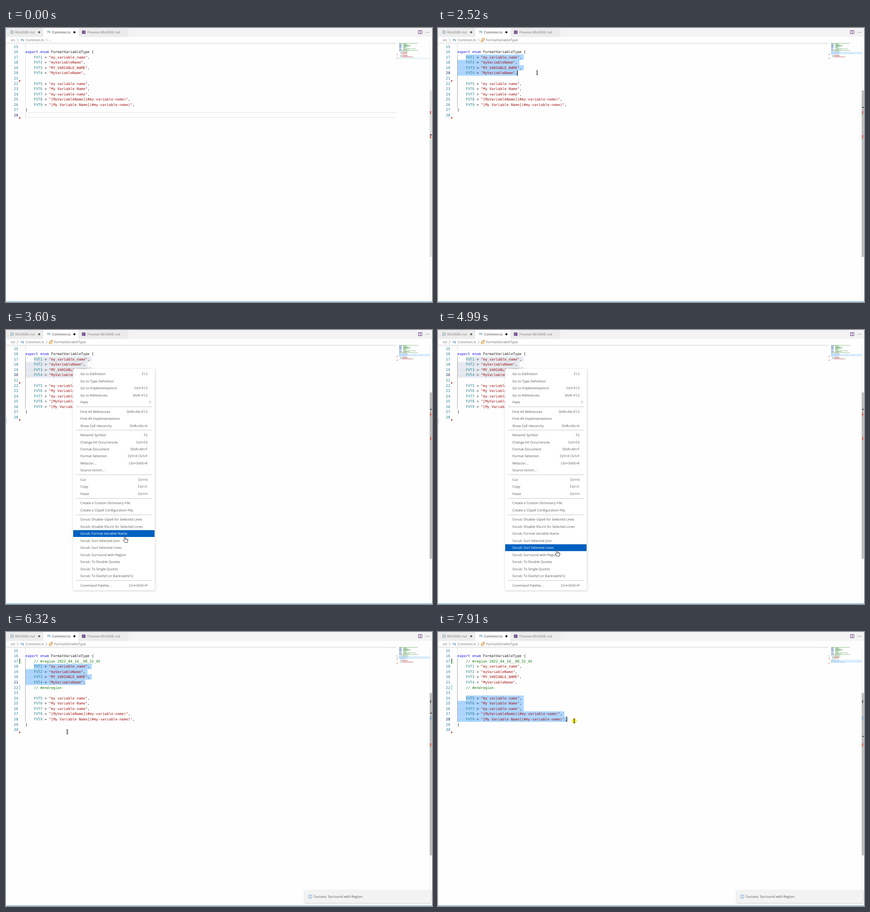
An HTML page with a canvas for the animation above (8 s loop, 932 by 601 pixels).

```html
<!DOCTYPE html>
<html lang="en">
<head>
<meta charset="utf-8">
<title>Surround with Region</title>
<style>
  html, body { margin: 0; height: 100%; overflow: hidden; background: #fff; }
  canvas { display: block; }
</style>
</head>
<body>
<canvas id="stage" width="932" height="601"></canvas>
<script>
const ctx = document.getElementById('stage').getContext('2d');
ctx.textRendering = 'geometricPrecision';

const LOOP = 8000;
const MENU_OPEN = 2860, MENU_CLOSE = 5200, INSERTED = 5270, TOAST = 5480;
const FIRST_LINE = 15, TOP = 35.1, LINE_H = 11.57, CHAR_W = 4.69, CODE_X = 42.2;
const UI = '7.45px "Open Sans", "Noto Sans", sans-serif';
const BOLD = '700 6.4px "Open Sans", "Noto Sans", sans-serif';
const MONO = '7.79px "DejaVu Sans Mono", monospace';
const UI_TEXT = '#585858';

const member = (n, value) => `    FVT${n} = "${value}",`;
const before = [
  '', 'export enum FormatVariableType {',
  member(1, 'my_variable_name'), member(2, 'myVariableName'),
  member(3, 'MY_VARIABLE_NAME'), member(4, 'MyVariableName'), '',
  member(5, 'my variable name'), member(6, 'My Variable Name'),
  member(7, 'my-variable-name'), member(8, '[MyVariableName](#my-variable-name)'),
  member(9, '[My Variable Name](#my-variable-name)'), '}', ''
];
const after = [...before];
after.splice(6, 0, '    // #endregion');
after.splice(2, 0, '    // #region 2022_04_10__08_32_45');

// '-' is a separator; shortcuts follow a bar
const ITEM_H = 15.45;
const menuItems = [];
const separators = [];
let menuY = 96.6;
for (const entry of [
  'Go to Definition|F12', 'Go to Type Definition', 'Go to Implementations|Ctrl+F12',
  'Go to References|Shift+F12', 'Peek', '-',
  'Find All References|Shift+Alt+F12', 'Find All Implementations', 'Show Call Hierarchy|Shift+Alt+H', '-',
  'Rename Symbol|F2', 'Change All Occurrences|Ctrl+F2', 'Format Document|Shift+Alt+F',
  'Format Selection|Ctrl+K Ctrl+F', 'Refactor...|Ctrl+Shift+R', 'Source Action...', '-',
  'Cut|Ctrl+X', 'Copy|Ctrl+C', 'Paste|Ctrl+V', '-',
  'Create a Custom Dictionary File.', 'Create a CSpell Configuration File.', '-',
  'Sorub: Disable cSpell for Selected Lines', 'Sorub: Disable ESLint for Selected Lines',
  'Sorub: Format Variable Name', 'Sorub: Sort Selected Json', 'Sorub: Sort Selected Lines',
  'Sorub: Surround with Region', 'Sorub: To Double Quotes', 'Sorub: To Single Quotes',
  'Sorub: To Slash(/) or Backslash(\\\\)', '-', 'Command Palette...|Ctrl+Shift+P'
]) {
  if (entry === '-') {
    separators.push(Math.round(menuY - 6));
    menuY += 5.1;
  } else {
    const [label, keys = ''] = entry.split('|');
    menuItems.push({ label, keys, y: menuY });
    menuY += ITEM_H;
  }
}

// time, x, y
const mousePath = [
  [210, 520, 590], [540, 343, 275], [800, 343, 275], [1600, 62, 64], [1930, 62, 64],
  [2320, 231, 101], [2450, 231, 101], [2720, 148, 85], [2860, 148, 85], [3140, 155, 106],
  [3530, 260, 453], [3600, 260, 453], [3800, 260, 483], [4990, 260, 483], [5150, 260, 496],
  [5780, 260, 496], [6320, 134, 219], [6580, 75, 143], [6650, 75, 143], [7050, 62, 144],
  [7180, 62, 144], [7910, 298, 195]
];

const clamp = (v, lo, hi) => Math.min(hi, Math.max(lo, v));

function mouseAt(t) {
  const i = mousePath.findIndex(p => p[0] > t);
  if (i <= 0) return mousePath.at(i);
  const [t0, x0, y0] = mousePath[i - 1], [t1, x1, y1] = mousePath[i];
  const u = (t - t0) / (t1 - t0), s = u * u * (3 - 2 * u);
  return [t, x0 + (x1 - x0) * s, y0 + (y1 - y0) * s];
}

const lineTop = n => TOP + (n - FIRST_LINE) * LINE_H;
const colX = c => CODE_X + c * CHAR_W;

function rect(x, y, w, h, color) {
  ctx.fillStyle = color;
  ctx.fillRect(x, y, w, h);
}
function text(s, x, y, color, font = UI, align = 'left') {
  ctx.font = font;
  ctx.textAlign = align;
  ctx.fillStyle = color;
  ctx.fillText(s, x, y);
}
function dot(x, y, r, color) {
  ctx.fillStyle = color;
  ctx.beginPath();
  ctx.arc(x, y, r, 0, 7);
  ctx.fill();
}
function stroke(path, color, width = 0.8) {
  ctx.strokeStyle = color;
  ctx.lineWidth = width;
  ctx.stroke(new Path2D(path));
}
const chevron = (x, y, color = '#777') => stroke(`M${x - 1.5} ${y - 3}l3 3-3 3`, color);
function infoIcon(x, y, r, color) {
  ctx.strokeStyle = color;
  ctx.lineWidth = 0.8;
  ctx.beginPath();
  ctx.arc(x, y, r, 0, 7);
  ctx.stroke();
  rect(x - 0.4, y - 0.6, 0.8, 2.5, color);
  rect(x - 0.4, y - 2.1, 0.8, 0.9, color);
}
function shadowBox(x, y, w, h, color) {
  ctx.save();
  ctx.shadowColor = 'rgba(0,0,0,.2)';
  ctx.shadowBlur = 4;
  ctx.shadowOffsetY = 1.2;
  rect(x, y, w, h, color);
  ctx.restore();
}

function tokens(line) {
  return [...line.matchAll(/(\/\/.*)|("[^"]*")|\b(export|enum)\b|(FVT\d)|\w+|\S/g)].map(m => ({
    s: m[0], col: m.index,
    color: m[1] ? '#147a14' : m[2] ? '#a31515' : m[3] ? '#1414e0' : m[4] ? '#267f86' : '#1e1e1e'
  }));
}

function dragSelection(anchor, t, lines) {
  const [, x, y] = mouseAt(t);
  const line = Math.max(anchor, Math.floor((y - TOP) / LINE_H) + FIRST_LINE);
  const col = clamp(Math.round((x - CODE_X) / CHAR_W), 0, lines[line - FIRST_LINE].length);
  return { from: anchor, line, col };
}
function selectionAt(t, lines) {
  if (t < 2000) return { from: 28, line: 28, col: 0, empty: true };
  if (t < INSERTED) return dragSelection(17, Math.min(t, 2320), lines);
  if (t < 7250) return { from: 18, line: 21, col: 28 };
  return dragSelection(24, t, lines);
}

function drawHeader(t) {
  rect(0, 0, 932, 19.5, '#f3f3f3');
  rect(0, 0, 81, 19.5, '#ececec');
  rect(82, 0, 76.5, 20, '#fff');
  rect(159, 0, 108.5, 19.5, '#ececec');
  infoIcon(13, 9, 3.4, '#5c7f96');
  text('README.md', 20, 12.2, '#808080');
  dot(72.5, 9.3, 2.4, '#6a6a6a');
  text('TS', 90, 11.4, '#3f7f9f', BOLD);
  text('Common.ts', 100.8, 12.2, '#333');
  dot(149.6, 9.3, 2.4, '#222');
  rect(166, 5.5, 8, 7.5, '#7f5f96');
  text('Preview README.md', 178, 12.2, '#808080');
  stroke('M902.5 5.5h7.5v7h-7.5zM906.2 5.5v7', '#693d80', 1);
  [919, 922, 925].forEach(x => dot(x, 9.4, 0.7, '#444'));

  text('src', 10.5, 29.2, '#6e6e6e');
  chevron(25.3, 26.5);
  text('TS', 32, 28.7, '#3f7f9f', BOLD);
  text('Common.ts', 43, 29.2, '#6e6e6e');
  chevron(88.5, 26.5);
  if (t < 2000) {
    text('...', 93.5, 29.2, '#6e6e6e');
  } else {
    stroke('M97 25v-2.3h5v3.4h-2M94.4 26h5v3.8h-5zM95.6 27.9h2.6M98.5 24.3h2', '#d18616', 0.9);
    text('FormatVariableType', 105, 29.2, '#6e6e6e');
  }
}

function drawSelection(sel, lines, color) {
  for (let n = sel.from; n <= sel.line; n++) {
    const line = lines[n - FIRST_LINE], y = lineTop(n);
    const start = n === sel.from ? 4 : 0;
    const end = n === sel.line ? sel.col : line.length + 1;
    if (end <= start) continue;
    rect(colX(start), y, (end - start) * CHAR_W, LINE_H + 0.1, color);
    for (let c = start; c < Math.min(end, line.length); c++) {
      if (line[c] === ' ') dot(colX(c + 0.5), y + 6, 0.55, 'rgba(51,51,51,.3)');
    }
  }
}

function drawEditor(t, lines, sel, menuOpen) {
  const inserted = lines === after;
  const fade = ctx.createLinearGradient(0, 32.5, 0, 36);
  fade.addColorStop(0, '#dedede');
  fade.addColorStop(1, '#fff');
  rect(0, 32.5, 854, 3.5, fade);
  rect(0, 20, 1, 580, '#efefef');

  if (sel.empty) {
    rect(42, 185, 812, 1, '#e2e2e2');
    rect(42, 196, 812, 1, '#e2e2e2');
  } else {
    drawSelection(sel, lines, menuOpen ? '#e5ebf1' : '#add6ff');
  }
  const blockEnd = lineTop(inserted ? 29 : 27);
  rect(42, 34, 0.9, 12.5, '#d6d6d6');
  rect(42, lineTop(17), 0.9, blockEnd - lineTop(17), sel.empty ? '#d6d6d6' : '#a0a0a0');
  if (sel.empty) rect(42, 185, 0.9, 12, '#d6d6d6');

  lines.forEach((line, i) => {
    const n = FIRST_LINE + i, y = lineTop(n) + 8.5;
    text(n, 26.6, y, n === sel.line ? '#0b216f' : '#237893', MONO, 'right');
    for (const k of tokens(line)) text(k.s, colX(k.col), y, k.color, MONO);
  });

  const deleted = inserted ? [lineTop(31)] : [lineTop(22), lineTop(29)];
  ctx.fillStyle = '#c4161c';
  deleted.forEach(y => ctx.fill(new Path2D(`M29 ${y - 2.4}l3 2.4-3 2.4z`)));
  if (inserted) {
    rect(29.3, lineTop(17), 1.7, LINE_H, '#2f7d3c');
    for (let y = 0; y < 11; y += 2) rect(29.3, lineTop(22) + y, 1.7, 1.2, '#5fa3d3');
  }

  const dragging = (t >= 2000 && t < 2320) || t >= 7250;
  const blinkStart = t < INSERTED ? 2320 : 5350;
  const blinkOn = Math.floor((t - blinkStart) / 500) % 2 === 0;
  if (!sel.empty && !menuOpen && (dragging || blinkOn)) {
    rect(colX(sel.col) - 0.3, lineTop(sel.line), 1.3, LINE_H, '#000');
  }
  if (menuOpen) rect(0, 194, 1, 13, '#9cc4e4');
}

function drawMinimap(lines, sel) {
  const rowY = n => 33.2 + (n - 1) * 1.22, unit = 0.61;
  if (sel.empty) rect(859, 66, 68, 0.8, '#a9dcec');

  ctx.globalAlpha = 0.6;
  rect(860, rowY(1), 41, 0.8, '#147a14');
  [10, 18, 14, 28, 24, 18, 10, 12, 0, 46, 22, 12].forEach((len, i) => {
    if (!len) return;
    rect(860, rowY(i + 2), 5.5, 0.8, '#1a4fa0');
    rect(869, rowY(i + 2), len * unit, 0.8, '#147a14');
  });
  rect(860, rowY(14), 41, 0.8, '#147a14');
  lines.forEach((line, i) => {
    for (const k of tokens(line)) {
      rect(860 + k.col * unit, rowY(FIRST_LINE + i), k.s.length * unit, 0.6, k.color);
    }
  });
  ctx.globalAlpha = 1;

  // the selected rows are covered by their highlight
  if (!sel.empty) {
    for (let n = sel.from; n <= sel.line; n++) {
      rect(859, rowY(n) - 0.2, 68, 1.22, '#d2e9fc');
      rect(860, rowY(n) - 0.2, lines[n - FIRST_LINE].length * unit, 1.22, '#b4d8f8');
    }
  }
  const marks = lines === after ? [52.5, 58.5, 68.5] : [58, 66];
  marks.forEach((y, i) => rect(855, y - 0.5, 1.5, 1.4, marks.length > 2 && !i ? '#2f7d3c' : '#c4161c'));
}

function drawScrollbar(t, lines, sel) {
  const inserted = lines === after;
  rect(927, 33, 0.8, 567, '#e3e3e3');
  const alpha = 0.18 + 0.23 * clamp((t - 210) / 200, 0, 1);
  const [y, h] = inserted ? [134, 356] : [137, 365];
  rect(927, y, 5, h, `rgba(100,100,100,${alpha})`);
  if (inserted) {
    rect(927.5, 149, 2.5, 7, '#6d716d');
    rect(927.5, 185.5, 2.5, 7, '#6ea3cf');
    rect(927.5, 244, 2.5, 7, '#d2695c');
  } else {
    rect(927.5, 182, 2.5, 7, '#d2695c');
    rect(927.5, 234.5, 2.5, 7.5, '#d2695c');
  }
  const cursorY = inserted ? 229 - (28 - sel.line) * 7.3 : 234 - (28 - sel.line) * 7.5;
  rect(927.5, cursorY - 0.7, 4.5, 1.4, '#2c2c2c');
}

function drawMenu(t) {
  shadowBox(146.5, 85, 179, 486, '#fff');
  const hoverY = Math.max(mouseAt(t - 70)[2], 90);
  for (const { label, keys, y } of menuItems) {
    const active = Math.abs(hoverY - y) < ITEM_H / 2;
    const color = active ? '#fff' : UI_TEXT;
    if (active) {
      const top = Math.round(y - ITEM_H / 2), bottom = Math.round(y + ITEM_H / 2);
      rect(147, top, 178, bottom - top, '#0060c0');
    }
    text(label, 162.7, y + 2.7, color);
    text(keys, 309.7, y + 2.7, color, UI, 'right');
    if (label === 'Peek') chevron(315, y, color);
  }
  separators.forEach(y => rect(153, y, 166, 1, '#c6c6c6'));
}

function drawToast(t) {
  const u = clamp((t - TOAST) / 300, 0, 1);
  ctx.save();
  ctx.globalAlpha = u;
  ctx.translate(0, 34 * (1 - u) ** 3);
  shadowBox(654, 567, 275.5, 27, '#f3f3f3');
  infoIcon(665.5, 580.4, 4, '#3f7fbf');
  text('Success: Surround with Region.', 673.3, 583.2, UI_TEXT);
  ctx.restore();
}

const hand = new Path2D('M-1.2 7.6V1a1.2 1.2 0 0 1 2.4 0V4.6l4.4 1q1.3.4 1.2 1.7l-.6 3.6-.8 2.1H.3L-3.3 8.6q-.2-1.6 2.1-1z');

function drawMouse(t, menuOpen) {
  const [, x, y] = mouseAt(t);
  const pressed = (t >= 2000 && t < 2380) || t >= 7250;
  if (pressed) dot(x, y, 5.5, 'rgba(240,230,40,.85)');
  ctx.save();
  ctx.translate(x, y);
  if (menuOpen && t > MENU_OPEN + 70) {
    ctx.fillStyle = '#fff';
    ctx.fill(hand);
    ctx.strokeStyle = '#1c1c2c';
    ctx.lineWidth = 0.9;
    ctx.stroke(hand);
    stroke('M1.2 5v2.5M3.1 5.4v2.3M5 6v2', '#1c1c2c', 0.6);
  } else {
    stroke('M-2-4.5h1.5q.5 0 .5.5v8q0 .5-.5.5H-2M2-4.5H.5Q0-4.5 0-4v8q0 .5.5.5H2', '#222', 0.9);
  }
  ctx.restore();
}

function draw(now) {
  const t = now % LOOP;
  const lines = t < INSERTED ? before : after;
  const sel = selectionAt(t, lines);
  const menuOpen = t >= MENU_OPEN && t < MENU_CLOSE;

  rect(0, 0, 932, 601, '#fefefe');
  drawEditor(t, lines, sel, menuOpen);
  drawHeader(t);
  drawMinimap(lines, sel);
  drawScrollbar(t, lines, sel);
  if (menuOpen) drawMenu(t);
  if (t >= TOAST) drawToast(t);
  rect(0, 600, 932, 1, '#45a3d6');
  if (t >= 210) drawMouse(t, menuOpen);
  requestAnimationFrame(draw);
}
requestAnimationFrame(draw);
</script>
</body>
</html>
```
